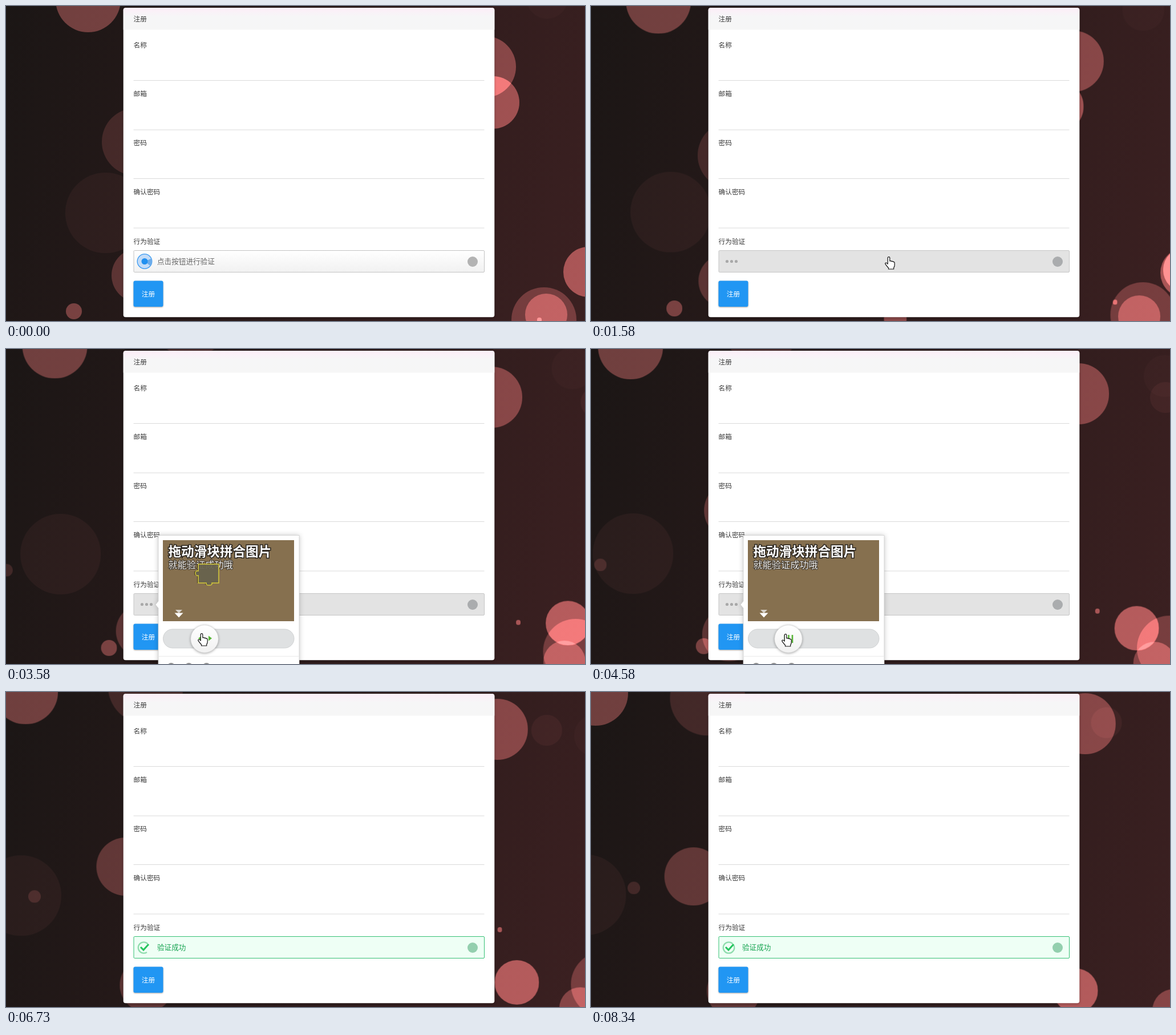
These frames come from a looping animation (1015 by 552 pixels, 8420 ms). An HTML page:

```html
<!DOCTYPE html>
<html lang="zh-CN">
<head>
<meta charset="utf-8">
<title>注册</title>
<style>
  html, body { margin: 0; width: 100%; height: 100%; overflow: hidden; background: #1d1716; }
  #stage { position: relative; width: 1015px; height: 552px; overflow: hidden; --loop: 8420ms; }
  #bokeh { position: absolute; inset: 0; isolation: isolate; overflow: hidden;
    background: linear-gradient(105deg, #1b1615, #3b2021); }
  #bokeh i { position: absolute; border-radius: 50%; background: rgb(255, 122, 122);
    mix-blend-mode: plus-lighter; animation: drift var(--loop) linear infinite; }
  @keyframes drift { to { transform: translate(var(--dx), var(--dy)); } }

  svg { position: absolute; left: 0; top: 0; }
  text { font-family: "Noto Sans CJK SC", "Noto Sans CJK", sans-serif; font-size: 12.6px; }
  .label text { font-size: 11.7px; fill: #3a3a3a; }
  #panel { filter: drop-shadow(0 1px 2px rgba(0, 0, 0, .3)); }
  #popup { filter: drop-shadow(0 0 4px rgba(0, 0, 0, .22)); }
  #knob > circle { filter: drop-shadow(0 1px 2px rgba(0, 0, 0, .35)); }
  #button { filter: drop-shadow(0 1px 1px rgba(0, 0, 0, .35)); }

  /* Hard state changes */
  .step { animation: var(--loop) step-end infinite; }
  #idle { animation-name: idle; }
  #detect { animation-name: detect; }
  #wait { animation-name: wait; }
  #done { animation-name: done; }
  .rest { animation-name: rest; }
  .drag { animation-name: drag; }
  #tip { animation-name: tip; }
  #hand { animation-name: hand; }
  #arrow { animation-name: arrow; }
  @keyframes idle { 0% { opacity: 1 } 10.7%, 100% { opacity: 0 } }
  @keyframes detect { 0% { opacity: 0 } 10.7% { opacity: 1 } 18.6%, 100% { opacity: 0 } }
  @keyframes wait { 0% { opacity: 0 } 18.6% { opacity: 1 } 74.5%, 100% { opacity: 0 } }
  @keyframes done { 0% { opacity: 0 } 74.5%, 100% { opacity: 1 } }
  @keyframes rest { 0% { opacity: 1 } 29.5% { opacity: 0 } 53.4%, 100% { opacity: 1 } }
  @keyframes drag { 0% { opacity: 0 } 29.5% { opacity: 1 } 53.4%, 100% { opacity: 0 } }
  @keyframes tip { 0% { opacity: 1 } 29.5%, 100% { opacity: 0 } }
  @keyframes hand { 0% { opacity: 0 } 6% { opacity: 1 } 54.5%, 100% { opacity: 0 } }
  @keyframes arrow { 0% { opacity: 0 } 3% { opacity: 1 } 6% { opacity: 0 } 54.5% { opacity: 1 } 72%, 100% { opacity: 0 } }

  /* Continuous motion */
  #popup { animation: popup var(--loop) linear infinite; }
  @keyframes popup { 0%, 19% { opacity: 0 } 21%, 73.5% { opacity: 1 } 75.5%, 100% { opacity: 0 } }
  .slide { animation: slide var(--loop) ease-in-out infinite; }
  @keyframes slide {
    0%, 29.5% { transform: translateX(0) }
    42%, 43% { transform: translateX(49px) }
    47%, 100% { transform: translateX(47px) }
  }
  #result { animation: result var(--loop) ease-out infinite; }
  @keyframes result { 0%, 54.5% { transform: translateY(22px) } 56.5%, 100% { transform: none } }
  #ring { stroke-dasharray: 0 100; animation: ring var(--loop) linear infinite; }
  @keyframes ring { 0%, 76% { stroke-dasharray: 0 100 } 81.2%, 100% { stroke-dasharray: 95 100 } }
  #cursor { animation: cursor var(--loop) ease-in-out infinite; }
  @keyframes cursor {
    0%, 3% { transform: translate(760px, 560px) }
    8.3%, 20% { transform: translate(522px, 440px) }
    26.5%, 29.5% { transform: translate(295px, 508px) }
    42%, 43% { transform: translate(343px, 499px) }
    47%, 54.5% { transform: translate(341px, 500px) }
    65%, 68% { transform: translate(929px, 533px) }
    72%, 100% { transform: translate(960px, 575px) }
  }
</style>
</head>
<body>
<div id="stage">
  <div id="bokeh"></div>
  <svg width="1015" height="552" viewBox="0 0 1015 552">
    <defs>
      <linearGradient id="head" x2="0" y2="1">
        <stop stop-color="#fdeef8"/><stop offset=".4" stop-color="#f6f6f7"/><stop offset="1" stop-color="#f6f6f6"/>
      </linearGradient>
      <linearGradient id="raised" x2="0" y2="1"><stop stop-color="#fff"/><stop offset="1" stop-color="#f1f1f1"/></linearGradient>
      <linearGradient id="sunk" x2="0" y2="1"><stop stop-color="#efefef"/><stop offset="1" stop-color="#fff"/></linearGradient>
      <clipPath id="picture"><rect x="275" y="335" width="230" height="142"/></clipPath>
      <path id="piece" d="M288 377h36v33h-12q1 4-5 4t-5-4h-14v-13q-5 1-5-4t5-4z"/>
      <rect id="bar" x="224" y="428.5" width="614.5" height="38" rx="1.5"/>
    </defs>

    <g id="panel">
      <rect x="205.7" y="3.2" width="650.6" height="542" rx="4" fill="#fff"/>
      <path d="M205.7 41.5V7.2a4 4 0 0 1 4-4H852.3a4 4 0 0 1 4 4V41.5z" fill="url(#head)"/>
    </g>
    <g class="label">
      <text x="223.5" y="27">注册</text>
      <text x="223.5" y="72.5">名称</text>
      <text x="223.5" y="158">邮箱</text>
      <text x="223.5" y="244">密码</text>
      <text x="223.5" y="330">确认密码</text>
      <text x="223.5" y="416.5">行为验证</text>
    </g>
    <path d="M223.5 130.5h615m-615 86.500h615m-615 85.500h615m-615 86.500h615" stroke="#dadada"/>

    <g id="idle" class="step">
      <use href="#bar" fill="url(#raised)" stroke="#c3c3c3"/>
      <circle cx="243" cy="447.5" r="12.8" fill="#c3dcf8" stroke="#3a9af2" stroke-width="1.3"/>
      <path d="M243 447.5l12-4.900a13 13 0 0 1-1.800 12.900z" fill="#6cacea"/>
      <circle cx="243" cy="447.5" r="5.5" fill="#2190f0"/>
      <text x="265" y="452.3" fill="#666">点击按钮进行验证</text>
      <circle cx="818" cy="448" r="9" fill="#b3b3b3"/>
    </g>
    <g id="detect" class="step">
      <use href="#bar" fill="url(#sunk)" stroke="#c3c3c3"/>
      <circle cx="243" cy="447.5" r="12.8" fill="#d3e2fa" stroke="#5a9df0" stroke-width="1.3"/>
      <circle cx="243" cy="447.5" r="5.5" fill="#2190f0"/>
      <text x="265" y="452.3" fill="#666">智能检测中</text>
      <circle cx="818" cy="448" r="9" fill="#b3b3b3"/>
    </g>
    <g id="wait" class="step">
      <use href="#bar" fill="#e3e3e3" stroke="#c6c6c6"/>
      <path d="M238.5 447.5h0m8 0h0m8 0h0" stroke="#a9a9a9" stroke-width="5.2" stroke-linecap="round"/>
      <circle cx="818" cy="448" r="9" fill="#aaacae"/>
    </g>
    <g id="done" class="step">
      <use href="#bar" fill="#eefff5" stroke="#35c074"/>
      <circle id="ring" r="9.7" pathLength="100" fill="none" stroke="#8fdcad" stroke-width="2.3"
        transform="translate(241.5 448) rotate(-45) scale(1 -1)"/>
      <path d="M236 447l5 5 9-10" fill="none" stroke="#26c55f" stroke-width="3"/>
      <text x="265" y="452.3" fill="#18a452">验证成功</text>
      <circle cx="818" cy="448" r="9" fill="#93cfae"/>
    </g>

    <g id="button">
      <rect x="223.5" y="481.5" width="52" height="45.5" rx="3" fill="#2196f3"/>
      <text x="249.5" y="508.5" text-anchor="middle" fill="#fff" style="font-size:11.7px;font-weight:500">注册</text>
    </g>

    <g id="popup">
      <path d="M267 326.5H514V560H267V454l-5-6 5-6z" fill="#fff" stroke="#cdcdcd" stroke-width=".8"/>
      <g clip-path="url(#picture)">
        <rect x="275" y="335" width="230" height="142" fill="#86704f"/>
        <text x="284.5" y="362.5" fill="#fff" stroke="#2b2620" stroke-width="3" paint-order="stroke"
          style="font-size:22.6px;font-weight:700">拖动滑块拼合图片</text>
        <text x="284.5" y="384" fill="#f4f2ee" stroke="#3a332a" stroke-width="2" paint-order="stroke"
          style="font-size:16.2px">就能验证成功哦</text>
        <path d="M297 457h12l-6 6z" fill="#d5d0c8"/>
        <path d="M295.5 462.5h15l-7.500 8z" fill="#fff"/>
        <g class="step drag">
          <use href="#piece" x="47" fill="#000" fill-opacity=".45"/>
          <g class="slide"><use href="#piece" fill="#6d6852" fill-opacity=".9" stroke="#d3c93a" stroke-width="1.5"/></g>
        </g>
        <g id="result">
          <rect x="275" y="456" width="230" height="21" fill="#5dbf70"/>
          <text x="289" y="471" fill="#fff" font-weight="500">2.0 秒的速度超过 96% 的用户</text>
        </g>
      </g>
      <rect x="275.5" y="491" width="229.5" height="33" rx="16.5" fill="#dfe1e2" stroke="#cfd1d2"/>
      <text id="tip" class="step" x="333" y="512.3" fill="#88949d">拖动左边滑块完成上方拼图</text>
      <g id="knob" class="slide">
        <circle cx="299" cy="508" r="24.2" fill="url(#raised)" stroke="#d5d5d5" stroke-width=".6"/>
        <path class="step rest" d="M293 501v14m6.500-14v14m6.500-14v14" stroke="#58b537" stroke-width="2.6"/>
        <path class="step drag" d="M294 502.5v9l-6-4.500zm12 0v9l6-4.500z" fill="#58b537"/>
      </g>
      <path d="M267 538.5H514" stroke="#eaeaea"/>
      <path d="M289.5 557h0m31 0h0m31 0h0" stroke="#8e8e8e" stroke-width="14" stroke-linecap="round"/>
    </g>

    <g id="cursor" stroke-linejoin="round">
      <path id="hand" class="step" fill="#fff" stroke="#111" stroke-width="1.2"
        d="M-1.8 1.5a1.8 1.8 0 0 1 3.6 0V7q2-1 3.2.6q2-.8 3 .8q2.2-.4 2.2 2V14q0 2.5-1.5 4.5V21H-.5V19q-3-3-5.5-6.8q-.6-2 1.2-2.2q1.6.2 3 2.2z"/>
      <path id="arrow" class="step" fill="#fff" stroke="#111" stroke-width=".8"
        d="M0 0V14l3.2-3 2.6 6 2.4-1-2.5-5.7H10z"/>
    </g>
  </svg>
</div>
<script>
  // x, y, radius, speed x, speed y (px/s), strength
  const discs = [
    [144, -11, 57, -16.3, 1.56, .33],
    [227, 238, 59, 12, 15, .14],
    [334, 234, 51, -18.5, 10.7, .25],
    [174, 362, 70.5, -22, -.84, .05],
    [232, 472, 47, 2.15, 6.2, .22],
    [119, 535, 14.3, 17.2, -3.1, .34],
    [-55, 420.6, 11, 15.6, -9.3, .14],
    [413, -98.4, 66, -25, 13, .14],
    [840.5, 106, 53.5, 3.1, -6.1, .33],
    [854, 169, 46, -23, 4.5, .42],
    [1021, 466, 44, 13.4, 1, .44],
    [1087.4, 448, 39, -28.45, 9.05, .49],
    [943, 550, 57, 15.5, -5.6, .24],
    [947, 541, 37, 8.9, 2, .3],
    [935, 550.5, 4.3, -10.3, -19.9, .45],
    [948, -15, 36.5, 12.5, 13.5, .022],
    [1133, 123, 27, -27.5, -8.3, .05],
    [543, 572, 20, -6, -15, .36]
  ];
  const seconds = 8.42;
  const bokeh = document.getElementById("bokeh");
  for (const [x, y, r, vx, vy, strength] of discs) {
    const disc = document.createElement("i");
    disc.style.cssText = `left:${x - r}px;top:${y - r}px;width:${2 * r}px;height:${2 * r}px;` +
      `opacity:${strength};--dx:${vx * seconds}px;--dy:${vy * seconds}px`;
    bokeh.append(disc);
  }
</script>
</body>
</html>
```
